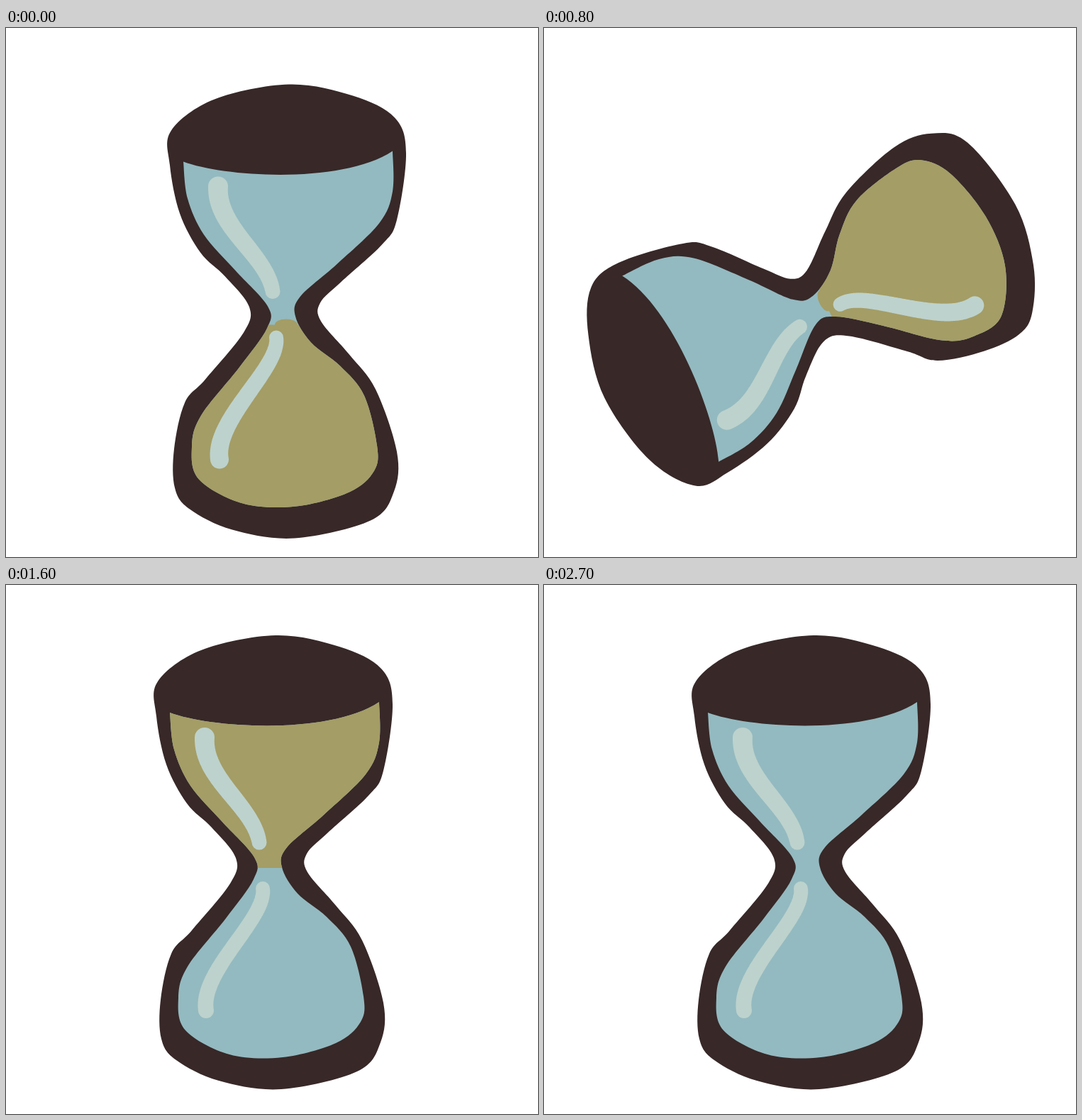
Animation of 750 by 746 pixels, one loop 2.8 s. Source, as an HTML page with a canvas:

```html
<!DOCTYPE html>
<html lang="en">
<head>
<meta charset="utf-8">
<title>Hourglass</title>
<style>
  html, body { margin: 0; width: 100%; height: 100%; overflow: hidden; background: #fff; }
  canvas { display: block; }
</style>
</head>
<body>
<canvas id="stage" width="750" height="746"></canvas>
<script>
const ctx = document.getElementById('stage').getContext('2d');
const DARK = '#382828', GLASS = '#93bac0', SAND = '#a49d65', SHINE = '#bdd2cd';
const STEP = 100, STEPS = 28, SPIN_END = 12, POUR_START = 17;
const CENTER = { x: 377.5, y: 391 };

// Catmull-Rom curve through a few key points.
function curve(points, closed) {
  const path = new Path2D(), count = points.length;
  const at = i => closed
    ? points[(i + count) % count]
    : points[Math.max(0, Math.min(count - 1, i))];
  path.moveTo(...points[0]);
  for (let i = 0; i < (closed ? count : count - 1); i++) {
    const [a, b, c, d] = [at(i - 1), at(i), at(i + 1), at(i + 2)];
    path.bezierCurveTo(
      b[0] + (c[0] - a[0]) / 6, b[1] + (c[1] - a[1]) / 6,
      c[0] - (d[0] - b[0]) / 6, c[1] - (d[1] - b[1]) / 6,
      ...c);
  }
  return path;
}

const body = curve([
  [380, 71], [470, 87], [529, 118], [545, 168], [532, 262], [511, 297], [453, 350],
  [424, 379], [425, 405], [465, 452], [502, 501], [532, 589], [528, 645], [495, 686],
  [388, 711], [300, 699], [240, 670], [219, 640], [218, 585], [233, 520], [262, 487],
  [316, 421], [324, 385], [290, 342], [255, 308], [226, 253], [212, 185], [214, 136],
  [275, 92]
], true);

// The glass runs from the right lens corner around both bulbs to the left one.
const glass = curve([
  [526, 165], [526, 222], [507, 267], [447, 325], [396, 370], [389, 398], [411, 435],
  [452, 468], [486, 510], [504, 580], [500, 616], [465, 646], [390, 666], [315, 662],
  [253, 628], [243, 582], [256, 538], [310, 470], [349, 415], [350, 384], [304, 333],
  [260, 283], [237, 232], [231, 180]
], false);
glass.bezierCurveTo(290, 202, 455, 212, 526, 165);

// Round brush moved along a cubic curve while its radius changes.
function brush(p, startRadius, endRadius) {
  const steps = 120;
  ctx.fillStyle = SHINE;
  ctx.beginPath();
  for (let i = 0; i <= steps; i++) {
    const t = i / steps, u = 1 - t;
    const [x, y] = [0, 1].map(k =>
      u ** 3 * p[0][k] + 3 * u * u * t * p[1][k] + 3 * u * t * t * p[2][k] + t ** 3 * p[3][k]);
    const radius = startRadius * u + endRadius * t;
    ctx.moveTo(x + radius, y);
    ctx.arc(x, y, radius, 0, Math.PI * 2);
  }
  ctx.fill();
}

function mound(top, left, rise, fall, right) {
  ctx.beginPath();
  ctx.moveTo(200, 700);
  ctx.lineTo(200, top + left + 15);
  ctx.lineTo(240, top + left);
  ctx.bezierCurveTo(315, top + rise, 400, top + fall, 520, top + right);
  ctx.lineTo(560, 700);
  ctx.fill();
}

function settledSand() {
  ctx.beginPath();
  ctx.rect(200, 410, 360, 300);
  ctx.ellipse(376, 410, 16, 8, 0, 0, Math.PI * 2);
  ctx.fill();
}

function upperSand(top) {
  ctx.save();
  ctx.beginPath();
  ctx.rect(200, 100, 360, 292);
  ctx.clip();
  mound(top, 50, -22, 4, 26);
  ctx.restore();
}

function stream() {
  ctx.strokeStyle = SAND;
  ctx.lineWidth = 27;
  ctx.beginPath();
  ctx.moveTo(371, 385);
  ctx.bezierCurveTo(374, 470, 362, 500, 360, 570);
  ctx.lineTo(360, 680);
  ctx.stroke();
}

function pouringSand(n) {
  if (n === STEPS - 1) return;
  if (n < POUR_START) {
    ctx.fillRect(200, 150, 360, 249);
    return;
  }
  const k = n - 20;
  upperSand(258 + 18.5 * k + 0.6 * k * k);
  stream();
  mound(560 - (k < 0 ? 40 : 22) * k, 26, -9, -6, 27);
}

// Half a turn in three uneven hand-turned stretches.
function spinAngle(n) {
  const keys = [0, 58.5, 114.5, 181.5];
  const i = Math.min(2, Math.floor(n / 4));
  return -(keys[i] + (keys[i + 1] - keys[i]) * (n / 4 - i)) * Math.PI / 180;
}

function draw(n) {
  const spinning = n <= SPIN_END;
  const drift = 0.3 ** n;
  ctx.fillStyle = '#fff';
  ctx.fillRect(0, 0, 750, 746);
  ctx.save();
  ctx.translate(CENTER.x + 19 * drift, CENTER.y + 8.5 * drift);
  ctx.rotate(spinning ? spinAngle(n) : 0);
  ctx.translate(-CENTER.x, -CENTER.y);

  ctx.fillStyle = DARK;
  ctx.fill(body);
  ctx.fillStyle = GLASS;
  ctx.fill(glass);
  ctx.clip(glass);

  ctx.fillStyle = SAND;
  if (spinning) settledSand();
  else pouringSand(n);

  brush([[280, 215], [277, 273], [349, 312], [357, 363]], 14, 10.5);
  brush([[362, 428], [368, 470], [273, 544], [282, 600]], 10, spinning ? 13 : 11);
  ctx.restore();
}

function tick() {
  draw(Math.floor(performance.now() / STEP) % STEPS);
  requestAnimationFrame(tick);
}
tick();
</script>
</body>
</html>
```
